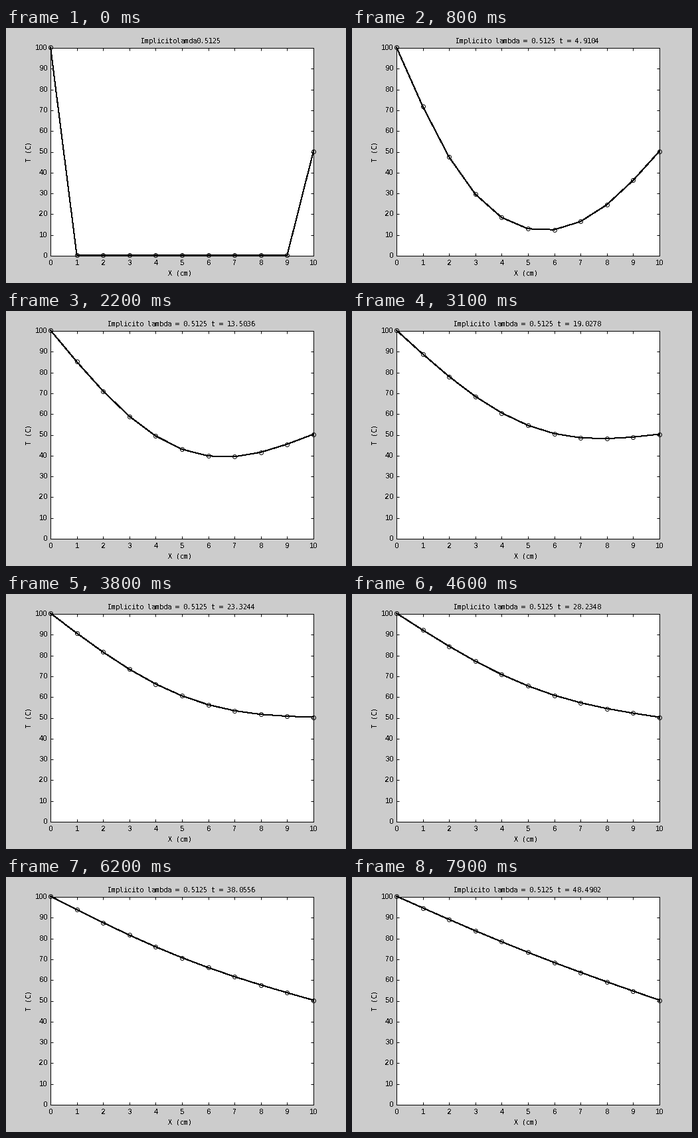
These frames come from a looping animation (512 by 384 pixels, 8 s). A matplotlib script:

```python
import numpy as np
import matplotlib.pyplot as plt
from matplotlib.animation import FuncAnimation
from matplotlib.transforms import offset_copy

W, H, DPI = 512, 384, 64
PX = 72 / DPI                      # points per pixel
LEFT, RIGHT, TOP, BOTTOM = 67, 463, 30, 343
PEN = 1.0 * PX                     # aliased strokes fill every pixel they touch

FRAMES, INTERVAL = 80, 100
DIFFUSIVITY, DT, DX, NODES = 0.835, 0.6138, 1.0, 11

plt.rcParams.update({
    "font.family": "DejaVu Sans Mono",
    "font.size": 10 * PX,
    "text.antialiased": False,
    "text.hinting": "force_autohint",
    "text.hinting_factor": 1,
})


def solve_rod():
    """Temperatures at every time step, by the implicit scheme."""
    lam = DIFFUSIVITY * DT / DX**2
    matrix = np.eye(NODES)
    for i in range(1, NODES - 1):
        matrix[i, i - 1:i + 2] = -lam, 1 + 2 * lam, -lam
    temp = np.zeros(NODES)
    temp[0], temp[-1] = 100, 50
    history = [temp]
    for _ in range(FRAMES - 1):
        history.append(np.linalg.solve(matrix, history[-1]))
    return history


def heading(step):
    if step == 0:
        return "Implicitolamda0.5125"
    return f"Implicito lambda = 0.5125 t = {step * DT:.6g}"


fig = plt.figure(figsize=(W / DPI, H / DPI), dpi=DPI, facecolor="#cccccc")
ax = fig.add_axes([LEFT / W, 1 - BOTTOM / H,
                   (RIGHT - LEFT) / W, (BOTTOM - TOP) / H])
ax.set(xlim=(0, 10), ylim=(0, 100),
       xticks=range(11), yticks=range(0, 101, 10))
ax.tick_params(direction="in", top=True, right=True, length=4 * PX,
               width=PX, labelbottom=False, labelleft=False)
for spine in ax.spines.values():
    spine.set(linewidth=PX, antialiased=False)


def label(x, y, text, ha="center", va="baseline", **kw):
    """Text placed in pixels from the top left of the stage."""
    return fig.text(x / W, 1 - y / H, text, ha=ha, va=va, **kw)


digits = dict(family="Liberation Sans", size=11 * PX)
for k in range(11):
    label(LEFT + 39.6 * k, 357, str(k), **digits)
    label(62, BOTTOM - 31.3 * k + 3, str(10 * k), ha="right", **digits)
label(262.5, 373, "X (cm)")
label(34.5, 186.5, "T (C)", va="center", rotation=90)
title = label(264, 23, "")

# The curve's two-pixel pen sits one pixel above the frame's.
history = solve_rod()
curve, = ax.plot(np.arange(NODES) * DX, history[0], "k-o", lw=PEN,
                 ms=6 * PX, mew=PEN, mfc="none", clip_on=False,
                 antialiased=False, zorder=5,
                 transform=offset_copy(ax.transData, fig, y=1, units="dots"))


def draw(step):
    curve.set_ydata(history[step])
    title.set_text(heading(step))
    return curve, title


anim = FuncAnimation(fig, draw, frames=FRAMES, interval=INTERVAL,
                     repeat=True, repeat_delay=0)
plt.show()
```
